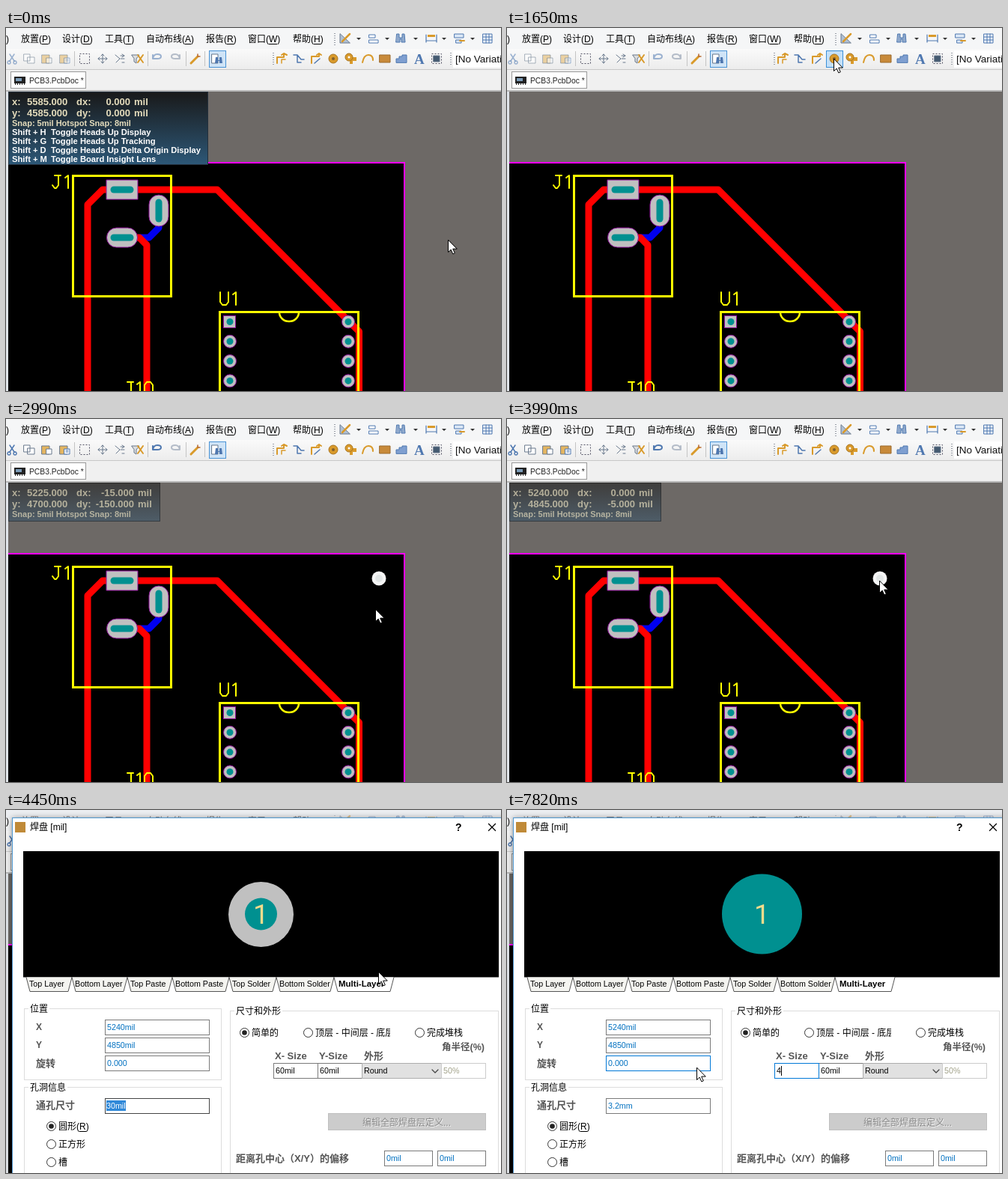
An HTML page with a canvas that plays this animation: 661 by 485 pixels, repeating every 8 s.

```html
<!DOCTYPE html>
<html lang="zh">
<head>
<meta charset="utf-8">
<title>PCB pad editing</title>
<style>
html, body { margin: 0; width: 100%; height: 100%; overflow: hidden; }
canvas { display: block; }
</style>
</head>
<body>
<canvas id="stage" width="661" height="485"></canvas>
<script>
const screen2d = document.getElementById('stage').getContext('2d');
// The dialog reaches past the stage, so its layer is larger
const layer = document.createElement('canvas');
layer.width = 700; layer.height = 520;
const layer2d = layer.getContext('2d');
let c = screen2d;

const FAMILY = '"Liberation Sans","Noto Sans CJK SC","Noto Sans CJK",sans-serif';
const TEAL = '#009090', PAD = '#c0c0c0', YELLOW = '#ffff00', LABEL = '#555', BLUE = '#0070c0';
const LOOP = 8000;

// ---- helpers ----
function rect(x, y, w, h, fill, stroke) {
  if (fill) { c.fillStyle = fill; c.fillRect(x, y, w, h); }
  if (stroke) { c.strokeStyle = stroke; c.lineWidth = 1; c.strokeRect(x + .5, y + .5, w - 1, h - 1); }
}
function path(d, x, y, fill, stroke, w = 1) {
  const p = new Path2D(d);
  c.save();
  c.translate(x, y);
  c.lineJoin = c.lineCap = 'round';
  if (fill) { c.fillStyle = fill; c.fill(p); }
  if (stroke) { c.strokeStyle = stroke; c.lineWidth = w; c.stroke(p); }
  c.restore();
}
function disc(x, y, r, fill, stroke) {
  c.beginPath();
  c.arc(x, y, r, 0, 7);
  if (fill) { c.fillStyle = fill; c.fill(); }
  if (stroke) { c.strokeStyle = stroke; c.lineWidth = 1; c.stroke(); }
}
function text(s, x, y, color = '#000', size = 12, weight = '', family = FAMILY) {
  c.font = `${weight} ${size}px ${family}`;
  c.fillStyle = color;
  c.fillText(s, x, y);
  return c.measureText(s).width;
}
// Label ending in an underlined access key, like "工具(T)"
function keyed(s, x, y) {
  const end = x + text(s, x, y), key = c.measureText(s.at(-2)).width, close = c.measureText(')').width;
  rect(Math.round(end - close - key), y + 2, Math.round(key), 1, '#000');
}
function linear(y0, y1, from, to) {
  const g = c.createLinearGradient(0, y0, 0, y1);
  g.addColorStop(0, from); g.addColorStop(1, to);
  return g;
}

// ---- pointer: [start, end, steps, x, y] ----
const moves = [
  [230, 230, 1, 590, 281], [550, 550, 1, 588, 272], [690, 1420, 8, 436, 41],
  [1760, 2250, 6, 498, 218], [2380, 2580, 3, 493, 254], [3220, 3660, 5, 484, 204],
  [3800, 3990, 3, 497, 216], [4750, 5530, 8, 173, 395], [7280, 7480, 3, 253, 344]
];
function pointer(t) {
  let x = 590, y = 283;
  for (const [a, b, n, X, Y] of moves) {
    if (t < a) break;
    const k = n > 1 ? Math.min(n, 1 + Math.floor((t - a) / (b - a) * (n - 1))) : 1;
    const u = k / n, e = u * u * (3 - 2 * u);
    x += (X - x) * e; y += (Y - y) * e;
  }
  return [x, y];
}
const arrow = (x, y) => path('M0 0V16L3.7 12.6 6.3 18.4 8.8 17.3 6.2 11.6H11.4Z', x, y, '#fff', '#000');
const beam = (x, y) => path('M-3-7h2l1 1 1-1h2M0-6V7M-3 8h2l1-1 1 1h2', x, y, null, '#000');

// ---- editor window ----
const menus = [['放置(P)', 20], ['设计(D)', 75], ['工具(T)', 132], ['自动布线(A)', 187],
  ['报告(R)', 267], ['窗口(W)', 323], ['帮助(H)', 383]];
const S = '#4f78b0', O = '#d99a2b', G = '#68788c';
// [x, y, path, fill, stroke, width]
const icons = [
  [452, 14, 'M-6-6V6H7Z', '#aebfd4', G], [452, 14, 'M-3 4 7-6', null, O, 2.5],
  [491, 14, 'M-6-5H2V-1H-6ZM-6 2H6V6H-6Z', '#fff', S],
  [527, 14, 'M-5-6h3v5h4v-5h3l1 11h-5v-4h-2v4h-5Z', '#8fa9cc', S],
  [568, 14, 'M-7-5V5M7-5V5M-7 3H7', null, S, 1.2], [568, 14, 'M-5-5H5V-2H-5Z', O],
  [605, 14, 'M-6-6H6V-1H-6ZM-4 2H3V6H-4Z', '#dce8f6', S], [605, 14, 'M1 3H7', null, O, 2],
  [643, 14, 'M-6-6H6V6H-6ZM-2-6V6M2-6V6M-6-2H6M-6 2H6', '#eef3fa', S],
  [129, 41, 'M0-6V6M-6 0H6M-2-4 0-6 2-4M-2 4 0 6 2 4M-4-2-6 0-4 2M4-2 6 0 4 2', null, G],
  [152, 41, 'M-6-5 0 0-5 5M1-4H6M1 0H6M3 5H6M3-6 6-4 3-2', null, G],
  [175, 41, 'M-7-5H3L-1 0V6L-4 4V0Z', '#ddd', G], [176, 41, 'M0-5 7 5M7-5 0 5', null, O, 2],
  [226, 41, 'M5 0H0Q-5 0-5-3T0-6 6 0M6-5V0H1', null, '#b4bcc8', 2],
  [253, 41, 'M-6 6 3-3', null, O, 3], [253, 41, 'M3-6V-3H6', null, '#b86a30', 1.5],
  [368, 41, 'M-6 6V-2H3V-6M0-5 3-7 7-5', null, O, 2], [366, 41, 'M2 6V1H7', null, O, 1.5],
  [391, 41, 'M-7-5H-2L3 1H7M-2-5V5H3', null, S, 1.5],
  [414, 41, 'M-6 6V-3H4V-7M1-5 4-7 7-5', null, O, 2], [414, 41, 'M-2 6 5 0', null, S, 1.5],
  [483, 41, 'M-7 5Q-5-5 1-5T7 2', null, O, 2], [506, 41, 'M-7-5H7V5H-7Z', '#c88a3a', '#9b6a2c'],
  [528, 41, 'M-7 5V0H-3V-3H1V-5H7V5Z', '#7f9fd0', S],
  [575, 41, 'M-4-4H4V4H-4Z', '#445a70', G]
];
const editIcons = [
  [8, 41, 'M-3-6 3 3M3-6-3 3', null, S, 1.5], [8, 41, 'M-4 3a2 2 0 1 0 .1 0M4 3a2 2 0 1 0 .1 0', null, S, 1.5],
  [31, 41, 'M-7-6H1V3H-7ZM-2-2H7V6H-2Z', '#fff', G],
  [54, 41, 'M-6-5H4V6H-6Z', '#e4b560', G], [54, 41, 'M0-1H7V6H0Z', '#fff', G],
  [78, 41, 'M-6-5H4V6H-6Z', '#e4b560', G], [78, 41, 'M0-1H7V6H0ZM2 1H5M2 3H5', '#fff', S],
  [202, 41, 'M-5 0H0Q5 0 5-3T0-6-6 0M-6-5V0H-1', null, S, 2]
];
const drawIcon = ([x, y, d, fill, stroke, w]) => path(d, x, y, fill, stroke, w);
function grip(x, y) {
  for (let i = 0; i < 6; i++) rect(x, y + i * 3, 2, 1, '#9a9fa8');
}
function bars(t) {
  rect(0, 0, 661, 85, '#f0f0f0');
  rect(0, 0, 661, 28, '#f5f6f7');
  rect(0, 28, 661, 27, linear(28, 55, '#fafafa', '#ececec'));
  rect(0, 55, 661, 1, '#c8c8c8');
  rect(0, 83, 661, 2, '#b8b8b8');
  text(')', 0, 19);
  for (const [s, x] of menus) keyed(s, x, 19);
  for (const x of [471, 509, 547, 585, 623]) path('M-3-1H3L0 2Z', x, 14, '#333');
  grip(438, 7); grip(356, 33); grip(593, 33);
  for (const x of [91, 189, 240, 265]) rect(x, 31, 1, 20, '#c4c4c4');
  rect(271, 30, 23, 23, '#cfe4f7', '#4a94d6');
  path('M-6-6H2V6H-6Z', 281, 41, '#fff', G);
  path('M-3-2h3v4h2v-4h3l1 8h-4v-3h-2v3h-4Z', 283, 41, S);
  if (t >= 1420 && t < 1760) rect(426, 30, 23, 23, '#c4e0f8', '#3c90d8');
  c.setLineDash([2, 2]);
  rect(98, 34, 14, 14, null, '#556'); rect(568, 34, 14, 14, null, '#556');
  c.setLineDash([]);
  icons.forEach(drawIcon);
  c.globalAlpha = t < 2990 ? .55 : 1;
  editIcons.forEach(drawIcon);
  c.globalAlpha = 1;
  disc(437, 41, 6, O, '#a87420'); disc(437, 41, 2, '#806030');
  rect(459, 39, 9, 5, O); disc(458, 39, 5, O, '#a87420'); disc(458, 39, 1.5, '#fff'); rect(459, 44, 4, 4, O);
  text('A', 545, 48, S, 19, 'bold', '"Liberation Serif",serif');
  rect(597, 30, 64, 23, '#fff');
  text('[No Variations]', 600, 46, '#111', 13.5);
  rect(6, 58, 101, 23, '#fff', '#999');
  rect(11, 65, 15, 9, '#222'); rect(13, 67, 8, 4, '#7c9cb8');
  for (let x = 12; x < 26; x += 3) rect(x, 74, 1, 2, '#222');
  text('PCB3.PcbDoc *', 31, 74, '#222', 10.3);
}

const glyphs = {
  J: 'M3 0H11M8 0V13L5 17H3L0 13', U: 'M0 0V13L3 17H8L11 13V0',
  1: 'M0 3 4 0V17', 0: 'M3 0 0 4V13L3 17H8L11 13V4L8 0Z'
};
function silk(s, x, y, gaps) {
  [...s].forEach((g, i) => path(glyphs[g], x + gaps[i], y, null, YELLOW, 2));
}
function slotPad(x, y, w, h, r, slot) {
  c.beginPath(); c.roundRect(x - w / 2, y - h / 2, w, h, r);
  c.fillStyle = PAD; c.fill();
  c.strokeStyle = '#90109a'; c.lineWidth = 1; c.stroke();
  path(slot, x, y, null, TEAL, 9);
}
function roundPad(x, y) {
  disc(x, y, 8.5, PAD, '#90109a'); disc(x, y, 4.5, TEAL);
}
function board() {
  rect(0, 85, 3, 400, '#dfe3e8');
  rect(3, 85, 658, 400, '#6d6966');
  rect(3, 181, 529, 304, '#000');
  rect(3, 179, 530, 2, '#f0f'); rect(531, 179, 2, 306, '#f0f');
  path('M204 246V267L191 280H178', 0, 0, null, '#0000f0', 9);
  path('M109 490V236L129 216H282L471.5 405.5V490M155 280H178L188 290V490', 0, 0, null, '#f00', 9);
  c.strokeStyle = YELLOW; c.lineWidth = 3;
  c.strokeRect(89.5, 197.5, 131, 161);
  c.strokeRect(285.5, 379.5, 185, 140);
  path('M365 380A13 12 0 0 0 391 380', 0, 0, null, YELLOW, 2.5);
  silk('J1', 62, 197, [0, 17]);
  silk('U1', 286, 353, [0, 17]);
  silk('J10', 159, 473, [0, 16, 26]);
  slotPad(155, 216, 42, 26, 0, 'M-11 0H11');
  slotPad(155, 280, 41, 26, 13, 'M-11 0H11');
  slotPad(204, 244, 26, 42, 13, 'M0-11V11');
  for (let i = 0; i < 4; i++) {
    const y = 392.5 + i * 26.3;
    if (i) roundPad(299, y);
    else { rect(290, 384, 17, 17, PAD, '#90109a'); disc(299, y, 4.5, TEAL); }
    roundPad(457, y);
  }
}

const mils = v => (Math.round(v / 5) * 5).toFixed(3);
function hud(t, cx, cy) {
  const full = t < 230, w = full ? 267 : 203, h = full ? 98 : 52;
  const x = 5240 + (cx - 497.5) / .2667, y = 4850 - (cy - 214.5) / .26, placed = t >= 2380;
  c.globalAlpha = full ? 1 : .55;
  rect(3, 85, w, h, linear(85, 85 + h, '#191919', full ? '#2d5878' : '#35536a'), full ? '#24303c' : '#222');
  c.globalAlpha = full ? 1 : .7;
  const edge = placed ? 171 : 166, ink = '#e4dcbc';
  [['x:', 'dx:', x, 5240], ['y:', 'dy:', y, 4850]].forEach(([a, d, v, origin], i) => {
    const by = 103 + i * 15, diff = placed ? mils(v - origin) : '0.000';
    text(a, 8, by, ink, 13, 'bold');
    text(mils(v), 28, by, ink, 13, 'bold');
    text(d, 94, by, ink, 13, 'bold');
    c.textAlign = 'right';
    text(diff, edge, by, ink, 13, 'bold');
    c.textAlign = 'left';
    text('mil', edge + 5, by, ink, 13, 'bold');
  });
  text('Snap: 5mil Hotspot Snap: 8mil', 8, 131, ink, 11, 'bold');
  if (full) ['Display', 'Tracking', 'Delta Origin Display', ''].forEach((s, i) => {
    const by = 143 + i * 12;
    text('Shift + ' + 'HGDM'[i], 8, by, '#fff', 11.2, 'bold');
    text(s ? 'Toggle Heads Up ' + s : 'Toggle Board Insight Lens', 60, by, '#fff', 11.2, 'bold');
  });
  c.globalAlpha = 1;
}

// ---- pad dialog ----
const SMALL = 10.7;
function field(x, y, w, s, color = BLUE, border = '#7a7a7a') {
  rect(x, y, w, 21, '#fff', border);
  text(s, x + 3, y + 14, color, SMALL);
}
function fieldWidth(s) {
  c.font = SMALL + 'px ' + FAMILY;
  return Math.round(c.measureText(s).width);
}
function selected(x, y, s) {
  rect(x, y, fieldWidth(s), 14, '#2f88d8');
  text(s, x, y + 11, '#fff', SMALL);
}
const caret = (s, x, y) => rect(x + fieldWidth(s), y, 1, 13, '#000');
function radio(x, y, on) {
  disc(x, y, 6, '#fff', '#333');
  if (on) disc(x, y, 3.3, '#222');
}
function group(x, y, w, s, h) {
  rect(x, y, w, h, null, '#dcdcdc');
  rect(x + 6, y, s.length * 12 + 4, 1, '#fff');
  text(s, x + 8, y + 5);
}
const layers = [['Top Layer', 27, 88], ['Bottom Layer', 88, 162], ['Top Paste', 162, 222],
  ['Bottom Paste', 222, 298], ['Top Solder', 298, 361], ['Bottom Solder', 361, 438], ['Multi-Layer', 438, 518]];
const typing = [[6410, '3'], [6740, '3.'], [6970, '3.2'], [7280, '3.2m'], [7380, '3.2mm']];

function dialog(t) {
  const ready = t >= 4340, tabbed = t >= 7480;
  const hole = typing.reduce((s, [at, v]) => t >= at ? v : s, '');
  rect(8, 10, 665, 520, '#fff', '#4f97cf');
  rect(12, 16, 14, 14, '#c08a38');
  text('焊盘 [mil]', 32, 27);
  text('?', 600, 28, '#000', 14, 'bold');
  path('M-4.5-4.5 4.5 4.5M4.5-4.5-4.5 4.5', 649, 23, null, '#000', 1.3);

  rect(23, 55, 635, 168, '#000');
  if (tabbed) disc(340.5, 139, 53.5, TEAL);
  else {
    disc(340.5, 139.5, 43.5, PAD);
    disc(340.5, 139, hole ? 2.3 : 21.5, TEAL);
  }
  c.textAlign = 'center';
  text('1', 340.5, 152, '#f4dc8c', 37, '', 'Roboto,sans-serif');
  c.textAlign = 'left';
  rect(23, 223, 635, 1, '#888');
  layers.forEach(([s, a, b], i) => {
    const last = i === 6;
    path(`M${a} 223.5L${a + 5} 242.5H${b - 5}L${b} 223.5`, 0, 0, last ? '#fff' : '#f4f4f0', '#555');
    text(s, a + (last ? 6 : 4), 236, '#000', last ? 11.5 : SMALL, last ? 'bold' : '');
  });

  group(24, 265, 264, '位置', 96);
  text('X', 40, 294, LABEL, 12, 'bold');
  text('Y', 40, 318, LABEL, 12, 'bold');
  text('旋转', 40, 343, LABEL, 13, 'bold');
  field(132, 280, 140, '5240mil');
  field(132, 304, 140, '4850mil');
  field(132, 328, 140, '0.000', BLUE, tabbed ? '#0078d7' : '#7a7a7a');

  group(24, 370, 264, '孔洞信息', 160);
  text('通孔尺寸', 40, 399, LABEL, 13, 'bold');
  field(132, 385, 140, hole, BLUE, tabbed ? '#7a7a7a' : '#444');
  if (!hole) {
    selected(134, 388, '30mil');
    if (t >= 5530 && t < 5980) caret('30mil', 134, 388);
  } else if (!tabbed) caret(hole, 136, 388);
  radio(60.5, 422.5, true); radio(60.5, 446.5); radio(60.5, 470.5);
  keyed('圆形(R)', 70, 427);
  text('正方形', 70, 451);
  text('槽', 70, 475);

  group(299, 268, 359, '尺寸和外形', 260);
  radio(318.5, 297.5, true);
  text('简单的', 328, 302);
  text('角半径(%)', 582, 321, LABEL, 12.5, 'bold');
  text('X- Size', 359, 333, LABEL, 13, 'bold');
  text('Y-Size', 418, 333, LABEL, 13, 'bold');
  text('外形', 478, 333, LABEL, 13, 'bold');
  text('距离孔中心（X/Y）的偏移', 307, 470, LABEL, 13, 'bold');
  field(576, 455, 65, '0mil');
  if (!ready) return;

  radio(403.5, 297.5); radio(552.5, 297.5);
  text('完成堆栈', 562, 302);
  c.save();
  c.beginPath(); c.rect(412, 285, 101, 24); c.clip();
  text('顶层 - 中间层 - 底层', 413, 302);
  c.restore();
  field(416, 338, 60, '60mil', '#000');
  const edited = t >= 7690;
  field(357, 338, 60, edited ? '4' : '60mil', '#000', tabbed ? '#0078d7' : '#7a7a7a');
  if (tabbed && !edited) selected(360, 341, '60mil');
  if (t >= 7820) caret('4', 360, 342);
  rect(475, 338, 107, 21, '#e1e1e1', '#adadad');
  text('Round', 478, 352, '#000', SMALL);
  path('M-4-2 0 2 4-2', 573, 349, null, '#444', 1.2);
  field(581, 338, 60, '50%', '#a0a088', '#ccc');
  rect(430, 405, 211, 23, '#cccccc', '#bfbfbf');
  text('编辑全部焊盘层定义...', 477, 423, '#f4f4f4');
  text('编辑全部焊盘层定义...', 476, 422, '#8a8a8a');
  field(505, 455, 65, '0mil');
}
function showDialog(t) {
  c = layer2d;
  c.clearRect(0, 0, layer.width, layer.height);
  dialog(t);
  c = screen2d;
  // the window zooms in while it fades in
  const [alpha, scale] = t < 4345 ? [.47, .973] : t < 4450 ? [.8, .99] : [1, 1];
  const grow = (1 - scale) / .027;
  c.save();
  if (alpha === 1) {
    rect(0, 0, 661, 11, 'rgba(232,234,238,.55)');
    c.shadowColor = 'rgba(0,0,0,.45)'; c.shadowBlur = 8;
    rect(8, 11, 665, 500, '#fff');
    c.shadowColor = 'transparent';
  }
  c.globalAlpha = alpha;
  c.translate(8.6 * grow, 10.5 * grow);
  c.scale(scale, scale);
  c.drawImage(layer, 0, 0);
  c.restore();
}

function draw(t) {
  const [x, y] = pointer(t), inside = y > 85;
  bars(t);
  board();
  if (t >= 4240) showDialog(t);
  else {
    if (t >= 2380) { disc(498, 213, 9.5, '#f6f6f6'); disc(498, 213, 5, '#e2e6e6'); }
    if (inside) hud(t, x, y);
    if (inside && t >= 1760 && t < 2990) {
      roundPad(x, y);
      rect(Math.round(x) - 50, Math.round(y), 101, 1, '#fff');
      rect(Math.round(x), Math.round(y) - 50, 1, 101, '#fff');
    }
  }
  // the pointer hides while typing
  if (t >= 6410 && t < 7480) return;
  if (t >= 5530 && t < 6410) beam(x + .5, y + .5);
  else arrow(x + .5, y + .5);
}

const start = performance.now();
function frame() {
  draw((performance.now() - start) % LOOP);
  requestAnimationFrame(frame);
}
frame();
</script>
</body>
</html>
```
